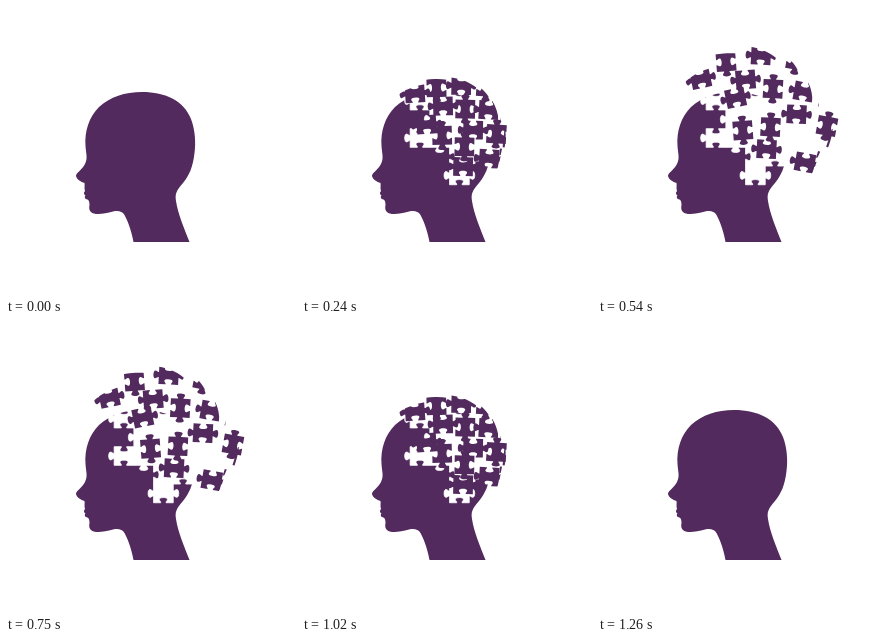
An HTML page with a canvas for the animation above (1.8 s loop, 290x290 px).

```html
<!DOCTYPE html>
<html lang="en">
<head>
<meta charset="utf-8">
<title>Puzzle head</title>
<style>
  html, body { margin: 0; width: 100%; height: 100%; overflow: hidden; background: #fff; }
  canvas { display: block; width: 290px; height: 290px; }
</style>
</head>
<body>
<canvas id="stage" width="290" height="290"></canvas>
<script>
const ctx = document.getElementById('stage').getContext('2d');
const LOOP = 1800, MOVE = 1260, STEP = 30;
const CELL = 19.2, PITCH_X = 19.7, PITCH_Y = 18.7;
const INK = '#522a5e';
const rad = deg => deg * Math.PI / 180;

const head = new Path2D(`M136 86 C160 86 178 95 185 113 C189 123 190 137 188.5 147
  C187 161 183 170 177 177 C170 185 169 188 170 195 C172 208 178 222 183.5 236
  H127.5 C126 228 123 217 118.5 209 C116 205 112 204.5 107 205.5 C101 207 95 208.5 90 208
  C84 207 82.5 204 83.5 199 C83.5 196 83 194.5 81.5 193.5 C79 193 78 191 79.5 189.5
  C77.5 188 77.5 186.5 79 185 C78 182 79 179 78.5 177 C75 176 70 173 70 169.5
  C71 166 76 164 79 158 C82 152 80 148 79.5 140 C78.5 125 83 111 93 101 C104 91 119 86 136 86 Z`);

// Sockets above and below, knobs left and right.
function makeTile() {
  const path = new Path2D(), h = CELL / 2;
  for (let side = 0; side < 4; side++) {
    const c = Math.cos(side * Math.PI / 2), s = Math.sin(side * Math.PI / 2);
    const inward = side % 2 ? -1 : 1;
    const at = (x, y) => {
      const v = inward * y - h;
      return [x * c - v * s, x * s + v * c];
    };
    const curve = (...pts) => path.bezierCurveTo(...pts.flatMap(p => at(...p)));
    if (!side) path.moveTo(-h, -h);
    path.lineTo(...at(-2.6, 0));
    curve([-2.4, 1.5], [-4, 2], [-4, 3.6]);
    curve([-4, 5.9], [4, 5.9], [4, 3.6]);
    curve([4, 2], [2.4, 1.5], [2.6, 0]);
    path.lineTo(...at(h, 0));
  }
  path.closePath();
  return path;
}

const shape = makeTile();
const holes = new Path2D();

// Each row bursts in a fan: heading at column 0, degrees added per column,
// and how far each column flies (0 stays in the head).
const rows = [
  { from: -125, fan: 21, reach: [28, 42, 48, 48] },
  { from: -92, fan: 16, reach: [0, 43, 37, 42, 42] },
  { from: -64, fan: 17, reach: [47, 11, 50, 56, 46] },
  { from: -211, fan: 74, reach: [0, 0, 35, 32, 32] },
  { from: -67, fan: 0, reach: [0, 0, 30] }
];

const pieces = rows.flatMap(({ from, fan, reach }, row) => reach.map((far, col) => {
  const x = 118 + col * PITCH_X, y = 94.6 + row * PITCH_Y;
  const heading = rad(Math.min(from + fan * col, 12));
  const place = new DOMMatrix().translate(x, y)
    .scale(PITCH_X / CELL, PITCH_Y / CELL)
    .rotate((col + row) % 2 * 90);
  const tile = new Path2D();
  tile.addPath(shape, place);
  if (far) holes.addPath(tile);
  return {
    x, y, tile, far,
    dx: far * Math.cos(heading),
    dy: far * Math.sin(heading),
    turn: rad(8 * (col - 1.6))
  };
})).filter(piece => piece.far);

function draw(ms) {
  const t = Math.min(Math.floor(ms % LOOP / STEP) * STEP, MOVE);
  const p = (1 - Math.cos(2 * Math.PI * t / MOVE)) / 2;
  ctx.fillStyle = '#fff';
  ctx.fillRect(0, 0, 290, 290);
  ctx.fillStyle = INK;
  ctx.fill(head);
  if (p < 1e-6) return;

  ctx.fillStyle = ctx.strokeStyle = '#fff';
  ctx.lineWidth = 0.8;
  ctx.fill(holes);
  ctx.stroke(holes);

  ctx.fillStyle = INK;
  for (const { x, y, dx, dy, turn, tile } of pieces) {
    ctx.save();
    ctx.translate(x + dx * p, y + dy * p);
    ctx.rotate(turn * p);
    ctx.translate(-x, -y);
    ctx.clip(tile);
    ctx.fill(head);
    ctx.restore();
  }
}

const start = performance.now();
function tick() {
  draw(performance.now() - start);
  requestAnimationFrame(tick);
}
tick();
</script>
</body>
</html>
```
